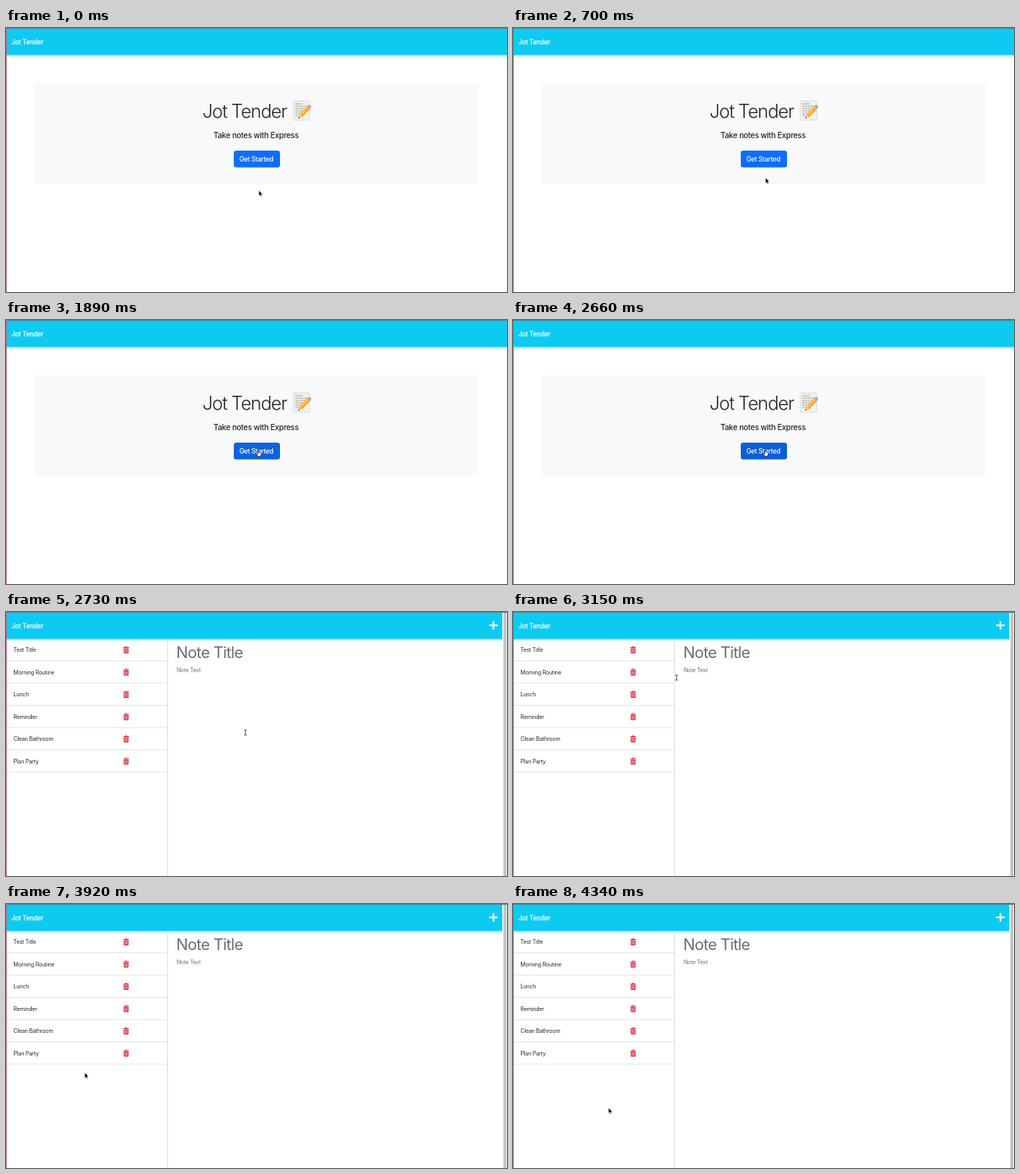
Recreate the animation shown at these times as an HTML page. Size 640 px wide and 338 px high, loop 4.41 s.

```html
<!DOCTYPE html>
<html lang="en">
<head>
<meta charset="utf-8">
<title>Jot Tender</title>
<style>
  html, body { margin: 0; width: 100%; height: 100%; overflow: hidden; background: #fff; }
  svg { display: block; width: 640px; height: 338px; }
  text { font-family: Inter, "Liberation Sans", sans-serif; font-optical-sizing: none; fill: #212529; }
  .brand { font-size: 8.4px; letter-spacing: -.2px; fill: #fff; text-shadow: 0 0 2px #fff8; }
  .hero { font-size: 23.5px; font-weight: 300; letter-spacing: -1px; }
  .lead { font-size: 10px; font-weight: 500; letter-spacing: -.3px; }
  .button { font-size: 8.6px; font-weight: 500; letter-spacing: -.3px; fill: #fff; }
  .row { font-size: 7px; letter-spacing: -.15px; }
  .title { font-size: 20px; letter-spacing: -.65px; }
  .hint { fill: #6c6c6c; }
  .cursor path { stroke-linejoin: round; stroke-linecap: round; }
</style>
</head>
<body>
<svg viewBox="0 0 640 338">
  <defs>
    <linearGradient id="shade" x2="0" y2="1">
      <stop stop-color="#0dcaf0" stop-opacity=".5"/>
      <stop offset="1" stop-color="#0dcaf0" stop-opacity="0"/>
    </linearGradient>
    <g id="trash" fill="#dc3545">
      <path d="M0 1.2h2.2l.5-.9h1.8l.5.9h2.2v1.1H0z"/>
      <path d="M.5 2.9h6.2v5.4q0 .9-.9.9H1.4q-.9 0-.9-.9z"/>
      <path d="M2.1 3.9v4.2M3.6 3.9v4.2M5.1 3.9v4.2" stroke="#fff" stroke-width=".5"/>
    </g>
  </defs>

  <rect id="bar" width="640" height="34.5" fill="#0dcaf0"/>
  <rect id="barShade" y="34.5" width="640" height="3" fill="url(#shade)"/>
  <text class="brand" x="7" y="20.7">Jot Tender</text>

  <g id="home">
    <rect x="36" y="71" width="568" height="128" fill="#f8f9fa"/>
    <text class="hero" x="251" y="114.5">Jot Tender</text>
    <g id="memo">
      <rect x="367" y="93.5" width="21" height="24.5" rx="1" fill="#f1f1ee" stroke="#d0d0cd" stroke-width=".7"/>
      <path d="M369.5 97h9M369.5 100h15M369.5 103h13M369.5 106h10M369.5 109h7M369.5 112h5" stroke="#8b8b8b" stroke-width=".9" stroke-dasharray="3 .7 2 .6"/>
      <path d="M373 116l1.8-5.2 3.6 3.4z" fill="#e9c796"/>
      <path d="M373 116l.7-2 1.4 1.3z" fill="#333"/>
      <path d="M374.8 110.8l9.7-10.2 3.6 3.4-9.7 10.2z" fill="#f5a623"/>
      <path d="M376 112l9.7-10.2" stroke="#ffd25c" stroke-width="1.3"/>
      <path d="M384.5 100.6l1-1 3.6 3.4-1 1z" fill="#a9adb0"/>
      <path d="M385.5 99.6l.9-.9q1.2-.7 2.4.5t.9 2.9l-.6.9z" fill="#e58a83"/>
    </g>
    <text class="lead" x="265" y="140.5">Take notes with Express</text>
    <rect id="start" x="291" y="157" width="59" height="21.5" rx="3.2"/>
    <text class="button" x="298" y="171">Get Started</text>
  </g>

  <g id="notes">
    <path d="M622.7 12.6v9.2M618.1 17.2h9.2" stroke="#fff" stroke-width="2.2" stroke-linecap="round"/>
    <g id="list"></g>
    <path d="M206.5 37v301" stroke="#dcdcdc"/>
    <text class="title hint" x="217.5" y="59.3">Note Title</text>
    <text class="row hint" x="218" y="76.6">Note Text</text>
    <rect x="634" width="6" height="338" fill="#fafafa"/>
    <rect x="635.5" y="1" width="3.6" height="337" fill="#c1c1c1"/>
  </g>

  <path d="M0 .5h640" stroke="#537f92"/>
  <path d="M.5 1v337" stroke="#b7688a"/>

  <g id="pointer" class="cursor">
    <path id="arrow" d="M0 0v7l1.6-1.4 1.1 2.5 1.2-.5-1.1-2.4h2.1z" fill="#000" stroke="#fff" stroke-width=".5"/>
    <path id="hand" d="M-.6.6q.6-1 1.2 0v2.6q1.1-.6 1.3.3 1-.5 1.2.4 1-.3 1 .6v1.6L3.2 8.4H-.2L-2.2 5.2q.2-1.1 1.6 0z" fill="#fff" stroke="#111" stroke-width=".7"/>
    <path id="beam" d="M-1.3-3.3Q0-3.3 0-2.6 0-3.3 1.3-3.3M0-2.6V2.6M-1.3 3.3Q0 3.3 0 2.6 0 3.3 1.3 3.3" fill="none" stroke="#222" stroke-width=".8"/>
  </g>
</svg>
<script>
const LOOP = 4410, STEP = 70, HOVER = 1750, PRESS = 2310, RELEASE = 2590, OPEN = 2730;
const $ = id => document.getElementById(id);
const show = (id, on) => $(id).style.display = on ? '' : 'none';

const titles = ['Test Title', 'Morning Routine', 'Lunch', 'Reminder', 'Clean Bathroom', 'Plan Party'];
$('list').innerHTML = titles.map((title, i) => `<g transform="translate(0 ${i * 28.5})">
  <text class="row" x="9.5" y="51.1">${title}</text>
  <use href="#trash" x="149.9" y="43.7"/>
  <path d="M1 62.5h205" stroke="#e4e4e4"/></g>`).join('');

// Pointer stops: time, x, y
const stops = [
  [0, 323, 208], [420, 322.5, 197], [560, 322.5, 197], [1260, 322.7, 171],
  [1680, 322.7, 171], [1890, 322, 166.3], [2240, 322, 166], [2660, 322, 166],
  [3150, 209, 84], [3570, 42.5, 85.3], [3640, 42.5, 92], [3990, 115, 247],
  [4130, 115, 247], [4340, 122, 261]
];

function pointerAt(t) {
  const i = stops.findIndex(s => s[0] >= t);
  if (i < 1) return stops[0].slice(1);
  const [t0, x0, y0] = stops[i - 1], [t1, x1, y1] = stops[i];
  const p = (t - t0) / (t1 - t0);
  return [x0 + (x1 - x0) * p, y0 + (y1 - y0) * p];
}

function buttonColor(t) {
  const mix = Math.min(1, Math.max(0, (t - HOVER) / 210));
  const from = [13, 110, 253], to = [11, 94, 215];
  return t >= PRESS && t < RELEASE ? '#0a58ca'
    : `rgb(${from.map((c, i) => c + (to[i] - c) * mix)})`;
}

function draw(now) {
  const t = Math.floor(now % LOOP / STEP) * STEP;
  const [x, y] = pointerAt(t);
  const open = t >= OPEN;
  const kind = !open ? (t < HOVER ? 'arrow' : 'hand')
    : x > 207 ? 'beam' : y < 205 ? 'hand' : 'arrow';

  show('home', !open);
  show('notes', open);
  for (const id of ['bar', 'barShade']) $(id).setAttribute('width', open ? 634 : 640);
  $('start').setAttribute('fill', buttonColor(t));
  for (const id of ['arrow', 'hand', 'beam']) show(id, id === kind);
  $('pointer').setAttribute('transform', `translate(${x} ${y})`);
  requestAnimationFrame(() => draw(performance.now() - start));
}

const start = performance.now();
draw(0);
</script>
</body>
</html>
```
